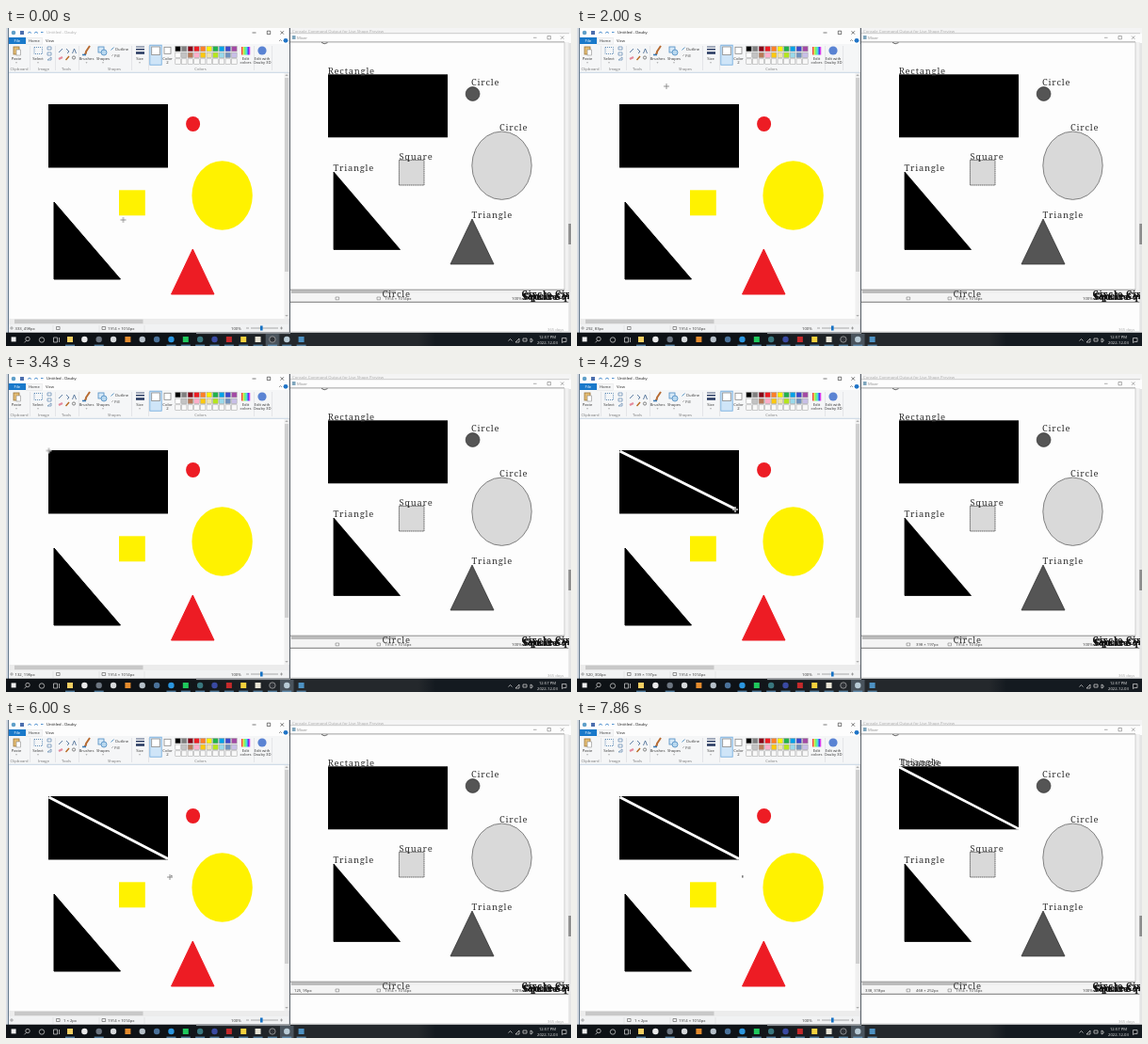
Write an HTML page that moves like this. It is 600 px wide and 338 px high and loops after 8000 ms.

```html
<!DOCTYPE html>
<html lang="en">
<head>
<meta charset="utf-8">
<title>Shape detection</title>
<style>
html, body { margin: 0; width: 100%; height: 100%; overflow: hidden; background: #fdfdfd; }
svg { display: block; width: 100vw; height: 100vh; }
text { font: 4.2px "Open Sans", "Noto Sans", sans-serif; fill: #333; }
.mid { text-anchor: middle; }
.group { fill: #777; }
.hershey text { font: 9.4px "Noto Serif", serif; letter-spacing: .75px; fill: #333; }
#pile text { font-weight: 600; fill: #111; }
.light { fill: #eee; }

/* every part shares one 8 s clock */
.anim { animation: 8s linear infinite; }
.hard { animation: 8s step-end infinite; opacity: 0; }

#cursor { animation-name: travel; }
@keyframes travel {
  0% { transform: translate(124.5px, 204px); }
  3.5% { transform: translate(124.5px, 200px); }
  14%, 18% { transform: translate(142px, 42px); }
  30.3%, 34% { transform: translate(59.5px, 77px); }
  41%, 44.6% { transform: translate(45.5px, 81.5px); }
  53.6% { transform: translate(168px, 144px); }
  57%, 60% { transform: translate(172px, 148px); }
  68%, 100% { transform: translate(174px, 167px); }
}
#cross { animation-name: cross; }
@keyframes cross { 0%, 20% { opacity: 1; } 12.4%, 82%, 100% { opacity: 0; } }
#arrow { animation-name: arrow; }
@keyframes arrow { 0%, 20%, 100% { opacity: 0; } 12.4% { opacity: 1; } }

/* the free end of the line follows the cursor */
#slash { animation-name: slash; }
@keyframes slash {
  0%, 44.6% { d: path("M45.5 82L45.5 82"); opacity: 0; }
  44.7% { d: path("M45.5 82L46 82.3"); opacity: 1; }
  53.6% { d: path("M45.5 82L168 143.5"); opacity: 1; }
  57%, 100% { d: path("M45.5 82L172 147.5"); opacity: 1; }
}
#dot, #p5 { animation-name: late; }
@keyframes late { 0% { opacity: 0; } 69.5%, 100% { opacity: 1; } }
#whole { animation-name: whole; }
@keyframes whole { 0% { opacity: 1; } 78.5%, 100% { opacity: 0; } }
#split, #r6 { animation-name: split; }
@keyframes split { 0% { opacity: 0; } 78.5%, 100% { opacity: 1; } }

#p1 { animation-name: p1; }
@keyframes p1 { 0% { opacity: 1; } 12.4%, 100% { opacity: 0; } }
#p2 { animation-name: p2; }
@keyframes p2 { 0%, 41%, 100% { opacity: 0; } 20% { opacity: 1; } }
#p3 { animation-name: p3; }
@keyframes p3 { 0%, 46.3%, 100% { opacity: 0; } 41% { opacity: 1; } }
#p4 { animation-name: p4; }
@keyframes p4 { 0%, 58.8%, 100% { opacity: 0; } 46.3% { opacity: 1; } }
#r4 { animation-name: r4; }
@keyframes r4 { 0%, 71.3%, 100% { opacity: 0; } 51.5% { opacity: 1; } }
#r5 { animation-name: r5; }
@keyframes r5 { 0%, 78.5%, 100% { opacity: 0; } 71.3% { opacity: 1; } }
#early { animation-name: early; }
@keyframes early { 0% { opacity: 1; } 8.8%, 100% { opacity: 0; } }
#active { animation-name: active; }
@keyframes active { 0% { opacity: 0; } 8.8%, 100% { opacity: 1; } }
#focus { animation: focus 8s step-end infinite; }
@keyframes focus { 0% { transform: translateX(-15.3px); } 8.8%, 100% { transform: none; } }
</style>
</head>
<body>
<svg viewBox="0 0 600 338" preserveAspectRatio="none">
  <defs>
    <linearGradient id="bar">
      <stop offset=".3" stop-color="#0e1216"/>
      <stop offset=".5" stop-color="#24282c"/>
      <stop offset=".73" stop-color="#24282c"/>
      <stop offset=".76" stop-color="#141a20"/>
    </linearGradient>
  </defs>
  <rect width="600" height="338" fill="#fdfdfd"/>

  <!-- windows behind -->
  <g>
    <rect x="301" width="299" height="6" fill="#f4f4f4"/>
    <text x="304" y="5" style="fill:#aaa">Console Command Output for Live Shape Preview</text>
    <rect x="302" y="5.5" width="296" height="286" fill="#fdfdfd"/>
    <path d="M302 5.7H598" stroke="#b5b5b5" stroke-width=".7"/>
    <path d="M302 14.9H593" stroke="#888" stroke-width=".8"/>
    <rect x="593" y="15" width="5" height="276" fill="#f2f2f2"/>
    <path d="M593 15V291" stroke="#c4c4c4" stroke-width=".8"/>
    <rect x="304" y="8" width="3.5" height="4" fill="#7fa6bd"/>
    <text x="309" y="11.7" style="fill:#888">Mixer</text>
    <path d="M560 10.3h3.5M575 8.5h3.4v3.4h-3.4zM589 8.5l3.4 3.4m0-3.4l-3.4 3.4" stroke="#777" stroke-width=".6" fill="none"/>
    <path d="M335 15.4q3 2.6 6.5.2" stroke="#444" stroke-width=".8" fill="none"/>

    <rect x="302" y="278" width="295" height="4.5" fill="#efefef"/>
    <rect x="303" y="279" width="111" height="3" fill="#bbb"/>
    <path d="M302 278.2H593" stroke="#777" stroke-width=".8"/>
    <rect x="302" y="282.5" width="295" height="8.5" fill="#f4f4f4"/>
    <path d="M302 291.3H598" stroke="#777" stroke-width="1"/>
    <path d="M302 322.5H600" stroke="#ddd" stroke-width=".7"/>
    <path d="M350 286h3.6v2.8H350zM394 286h3.5v2.8H394z" fill="none" stroke="#666" stroke-width=".5"/>
    <text x="402" y="289">1914 × 1014px</text>
    <text x="537" y="289">100%</text>
    <g id="r4" class="hard"><text x="360" y="289">398 × 197px</text></g>
    <g id="r5" class="hard"><text x="306" y="289">125, 95px</text></g>
    <g id="r6" class="hard"><text x="306" y="289">338, 318px</text><text x="360" y="289">468 × 252px</text></g>
    <rect x="597.3" y="16" width="2.7" height="307" fill="#e4e4e4"/>
    <rect x="597.3" y="208" width="2.7" height="22" fill="#8c8c8c"/>
    <text x="575" y="322" style="fill:#aaa">365 days</text>
  </g>

  <!-- detected shapes -->
  <g>
    <rect x="342" y="49.3" width="127" height="67" fill="#000"/>
    <circle cx="495.6" cy="70" r="7.4" fill="#555" stroke="#333" stroke-width=".7"/>
    <polygon id="oval" fill="#d9d9d9" stroke="#666" stroke-width=".8"/>
    <rect x="417.4" y="140.4" width="26.6" height="26.6" fill="#d9d9d9" stroke="#444" stroke-width=".8" stroke-dasharray="1.5 .5"/>
    <path d="M348 153V235.5H418.5Z" fill="#000" stroke="#000" stroke-width=".8"/>
    <path d="M495 203L472 251H518Z" fill="#555" stroke="#333" stroke-width=".8"/>
  </g>
  <g class="hershey">
    <text x="494" y="61.2">Circle</text>
    <text x="524" y="108.6">Circle</text>
    <text x="417.5" y="140.4">Square</text>
    <text x="347.5" y="152">Triangle</text>
    <text x="494.5" y="201.5">Triangle</text>
    <text x="399.5" y="286.3">Circle</text>
    <g id="pile"></g>
    <g id="whole" class="hard"><text x="341.7" y="49.4">Rectangle</text></g>
    <g id="split" class="hard">
      <path d="M342 50L469 115.7" stroke="#fff" stroke-width="2.6"/>
      <text x="342" y="48">Triangle</text><text x="344" y="49">Triangle</text>
    </g>
  </g>

  <!-- drawing window -->
  <rect width="302" height="324" fill="#fdfdfd"/>
  <rect width="2.5" height="324" fill="#d5dbe2"/>
  <path d="M2.6 0V324" stroke="#344e68" stroke-width=".8"/>
  <path d="M301.3 0V324" stroke="#333b45" stroke-width="1"/>
  <circle cx="8" cy="5" r="2.3" fill="#5f9fc9"/>
  <rect x="15" y="3" width="4" height="4" fill="#4c6fae"/>
  <path d="M23 5.5q2-3 4 0M30 5.5q2-3 4 0M37 4.5h2.5" fill="none" stroke="#2979c4" stroke-width=".8"/>
  <g id="early" class="hard"><text x="43" y="6.4" style="fill:#aaa">Untitled - Dauby</text></g>
  <g id="active" class="hard"><text x="43" y="6.4" style="fill:#111">Untitled - Dauby</text></g>
  <path d="M261.5 5h4M277.3 3.2h3.4v3.4h-3.4zM291.5 3.2l3.5 3.5m0-3.5l-3.5 3.5" fill="none" stroke="#222" stroke-width=".6"/>
  <rect x="3" y="10" width="18" height="7" fill="#1979ca"/>
  <text x="8.5" y="15" style="fill:#fff">File</text>
  <rect x="3" y="17" width="298" height="30" fill="#f5f6f7"/>
  <rect x="21.5" y="10.3" width="17" height="7" fill="#f5f6f7" stroke="#ddd" stroke-width=".4"/>
  <text x="24" y="15">Home</text><text x="42" y="15">View</text>
  <path d="M290 14l1.5-1.5 1.5 1.5" fill="none" stroke="#555" stroke-width=".6"/>
  <circle cx="297" cy="13.3" r="2.4" fill="#1f74c7"/>
  <path d="M3 47.3H300" stroke="#b9cbdd" stroke-width=".8"/>
  <g id="ribbon"></g>

  <g fill="none" stroke-width=".8">
    <rect x="8" y="20" width="6" height="8" fill="#e5bd73" stroke="#98743b"/>
    <rect x="11" y="23" width="4.5" height="6" fill="#fff" stroke="#777" stroke-width=".5"/>
    <rect x="30" y="20.5" width="8.5" height="7" stroke="#3f76aa" stroke-dasharray="1"/>
    <path d="M44 20h4v3h-4zM44 26h4v3h-4zM44 34l4-3v3z" stroke="#6f94b7"/>
    <path d="M56 26l4-4M64 22l3 3-2 2M70.5 27l2-5 2 5" stroke="#3d638d"/>
    <path d="M56 33l4-2" stroke="#e58a9c" stroke-width="2.2"/>
    <path d="M63.5 34l3.5-4" stroke="#b5651d" stroke-width="1.4"/>
    <circle cx="72" cy="31.5" r="1.6" stroke="#666"/>
    <path d="M83 28q2 0 2-3l4-6" stroke="#b76b32" stroke-width="2"/>
    <path d="M81 28.5h4" stroke="#397bb5" stroke-width="1.6"/>
    <rect x="98" y="20" width="6" height="6" fill="#d5e8f7" stroke="#4d8bc0"/>
    <circle cx="104" cy="26" r="3" fill="#b8d8ef" stroke="#4d8bc0"/>
    <path d="M111.5 23.5l3-3" stroke="#3a83bd"/>
    <path d="M112 30l2-2" stroke="#aaa"/>
    <path d="M138 20h9" stroke="#24365e"/>
    <path d="M138 22.7h9" stroke="#24365e" stroke-width="1.4"/>
    <path d="M138 26.5h9" stroke="#24365e" stroke-width="2.5"/>
    <rect x="152.8" y="18.2" width="12.4" height="21" fill="#cfe5f8" stroke="#6da9dc"/>
    <rect x="154.7" y="20" width="8.6" height="8.6" fill="#fff" stroke="#888"/>
    <rect x="168" y="20.3" width="7" height="7" fill="#fff" stroke="#888"/>
  </g>
  <g id="palette"></g>
  <g id="rainbow"></g>
  <circle cx="272" cy="24" r="4.6" fill="#5a83d3"/>

  <!-- scroll bars and status -->
  <rect x="295.5" y="48" width="5" height="261" fill="#f0f0f0"/>
  <rect x="296" y="53" width="4" height="206" fill="#d0d0d0"/>
  <path d="M296.8 51l1.2-1.3 1.2 1.3M296.8 305l1.2 1.3 1.2-1.3" fill="none" stroke="#666" stroke-width=".6"/>
  <rect x="3" y="309" width="297" height="6" fill="#ececec"/>
  <rect x="9" y="309.7" width="136.5" height="4.5" fill="#c8c8c8"/>
  <rect x="3" y="315" width="297" height="8.5" fill="#f1f2f3"/>
  <path d="M6 317v4M4 319h4" stroke="#666" stroke-width=".5"/>
  <path d="M50 316v7M99 316v7M147 316v7" stroke="#d5d5d5" stroke-width=".5"/>
  <path d="M53.5 317.5h3.6v3h-3.6zM102 317.5h3.6v3H102z" fill="none" stroke="#555" stroke-width=".6"/>
  <text x="108" y="320.6">1914 × 1014px</text>
  <text x="239" y="320.6">100%</text>
  <path d="M255 319h3M260 319h29M291 319h3m-1.5-1.5v3" stroke="#777" stroke-width=".6"/>
  <rect x="270" y="316.5" width="2.6" height="5" fill="#1672c5"/>
  <g id="p1" class="hard"><text x="9.5" y="320.6">333, 498px</text></g>
  <g id="p2" class="hard"><text x="9.5" y="320.6">292, 83px</text></g>
  <g id="p3" class="hard"><text x="9.5" y="320.6">132, 198px</text></g>
  <g id="p4" class="hard"><text x="9.5" y="320.6">520, 304px</text><text x="61" y="320.6">399 × 197px</text></g>
  <g id="p5" class="hard"><text x="61" y="320.6">1 × 2px</text></g>

  <!-- drawn shapes -->
  <rect x="45" y="81" width="127" height="67.5" fill="#000"/>
  <ellipse cx="198.6" cy="102" rx="7.5" ry="8" fill="#ed1c24"/>
  <ellipse cx="229.6" cy="178" rx="32.2" ry="36.8" fill="#fff200"/>
  <rect x="120" y="172.3" width="27.8" height="27" fill="#fff200"/>
  <path d="M51 185V267H121.5Z" fill="#000" stroke="#000"/>
  <path d="M198.3 235L175.5 283H221Z" fill="#ed1c24" stroke="#ed1c24" stroke-linejoin="round"/>
  <path id="slash" class="anim" d="M45.5 82L172 147.5" stroke="#fff" stroke-width="2.9"/>
  <g id="dot" class="hard"><rect x="175" y="165.2" width="1.6" height="2.4" fill="#777"/></g>

  <!-- taskbar -->
  <rect y="323.7" width="600" height="14.3" fill="url(#bar)"/>
  <rect x="202" y="323.5" width="100" height="1.6" fill="#8d9196"/>
  <rect id="focus" x="291" y="325" width="14.5" height="13" fill="#4a545d"/>
  <g id="tasks"></g>
  <g fill="none" stroke="#ddd" stroke-width=".7">
    <circle cx="23" cy="330.5" r="2.2"/><path d="M21.5 332.3l-2 2"/>
    <circle cx="38" cy="331.5" r="2.7"/>
    <path d="M50.5 329h4v5h-4zM56.5 329v5"/>
    <path d="M533.5 332.5l2-2 2 2M541 334l4-4v4zM549 330h4v3h-4zM557 330v4l2-1v-2z"/>
    <path d="M590.5 329.5h4.5v4H592l-1.5 1z"/>
  </g>
  <text class="mid light" x="575" y="330.3">12:57 PM</text>
  <text class="mid light" x="575" y="335.8">2022-12-03</text>

  <g id="cursor" class="anim">
    <g id="cross" class="hard">
      <path d="M-3 0H3M0-3V3" stroke="#fff" stroke-width="1.5"/>
      <path d="M-3 0H3M0-3V3" stroke="#777" stroke-width=".8"/>
    </g>
    <g id="arrow" class="hard">
      <path d="M-1-2.5V3l1.3-1.1 1 2.1.9-.4-1-2H3.2z" fill="#fff" stroke="#222" stroke-width=".6"/>
    </g>
  </g>
</svg>
<script>
const NS = "http://www.w3.org/2000/svg";
const $ = id => document.getElementById(id);

function add(parent, tag, attrs, label) {
  const el = document.createElementNS(NS, tag);
  for (const key in attrs) el.setAttribute(key, attrs[key]);
  if (label) el.textContent = label;
  $(parent).append(el);
}
const box = (parent, x, y, width, height, fill, more) =>
  add(parent, "rect", { x, y, width, height, fill, ...more });

// Ribbon captions and dividers
const captions = [
  ["Paste", 11, 34], ["Select", 34, 34], ["Brushes", 85.5, 34], ["Shapes", 103, 34],
  ["Outline", 123, 23.5], ["Fill", 118, 30.5], ["Size", 142, 34],
  ["Color", 159, 33.5], ["1", 159, 38], ["Color", 171.5, 33.5], ["2", 171.5, 38],
  ["Edit", 254.5, 33.5], ["colors", 254.5, 38], ["Edit with", 272, 33.5], ["Dauby 3D", 272, 38]
];
for (const [label, x, y] of captions) add("ribbon", "text", { x, y, class: "mid" }, label);

const groups = [["Clipboard", 14], ["Image", 40], ["Tools", 64], ["Shapes", 115], ["Colors", 206.5]];
for (const [label, x] of groups) add("ribbon", "text", { x, y: 44.5, class: "mid group" }, label);

for (const x of [25, 52, 77, 133.5, 151, 263, 282]) box("ribbon", x, 19, .5, 26, "#d2d5d9");
for (const x of [11, 34, 85.5, 103, 142])
  add("ribbon", "path", { d: `M${x - 1} 36.5h2l-1 1z`, fill: "#777" });

// Colour swatches
const swatches = [
  "#000 #7f7f7f #880015 #ed1c24 #ff7f27 #fff200 #22b14c #00a2e8 #3f48cc #a349a4",
  "#fff #c3c3c3 #b97a57 #ffaec9 #ffc90e #efe4b0 #b5e61d #99d9ea #7092be #c8bfe7",
  Array(10).fill("#f8f8f8").join(" ")
];
swatches.forEach((row, j) => row.split(" ").forEach((fill, i) =>
  box("palette", 179.8 + i * 6.65, 19.4 + j * 6.7, 5.5, 5.5, fill, { stroke: "#a0a0a0", "stroke-width": .5 })));
for (let i = 0; i < 8; i++) box("rainbow", 250 + i * 1.15, 20, 1.2, 8.5, `hsl(${i * 42} 85% 58%)`);

// Detected oval: a many-sided outline
$("oval").setAttribute("points", Array.from({ length: 24 }, (_, i) => {
  const a = i * Math.PI / 12;
  return `${526.5 + 31.7 * Math.cos(a)},${146.2 + 36.2 * Math.sin(a)}`;
}).join(" "));

// Labels written on top of each other at the lower right
const pile = [["Circle", 547.5, 286], ["Square", 548, 288.5], ["Circle", 549, 287.5],
  ["Square", 550, 289], ["Circle", 583, 286], ["Square", 583.5, 288.5], ["Circle", 584.5, 287.5]];
for (const [label, x, y] of pile) add("pile", "text", { x, y }, label);
box("pile", 598, 280, 2, 11, "#e6e6e6");

// Taskbar buttons
box("tasks", 5.6, 328.4, 5, 5, "#eee");
const tasks = ["#f3cf62", "#e9e9e9", "#6c7580", "#d5d8da", "#e48b2d", "#b5bfc8", "#4a7199", "#2b96df",
  "#1fc85c", "#39767d", "#3a4aa2", "#c52a2b", "#f4d13d", "#e8e4d5", "#303338", "#b8cbd6", "#4d91c2"];
tasks.forEach((fill, i) => {
  const x = 68 + i * 15.35;
  if (i % 4 === 0 || i === 11 || i === 13)
    box("tasks", x - 3, 328, 6, 6, fill);
  else
    add("tasks", "circle", { cx: x, cy: 331, r: 3.2, fill, stroke: i === 14 ? "#ccc" : "none", "stroke-width": .6 });
  if (i === 0 || i === 2 || i > 6) box("tasks", x - 5, 336.7, 10, 1, "#70a9d4");
});
</script>
</body>
</html>
```
